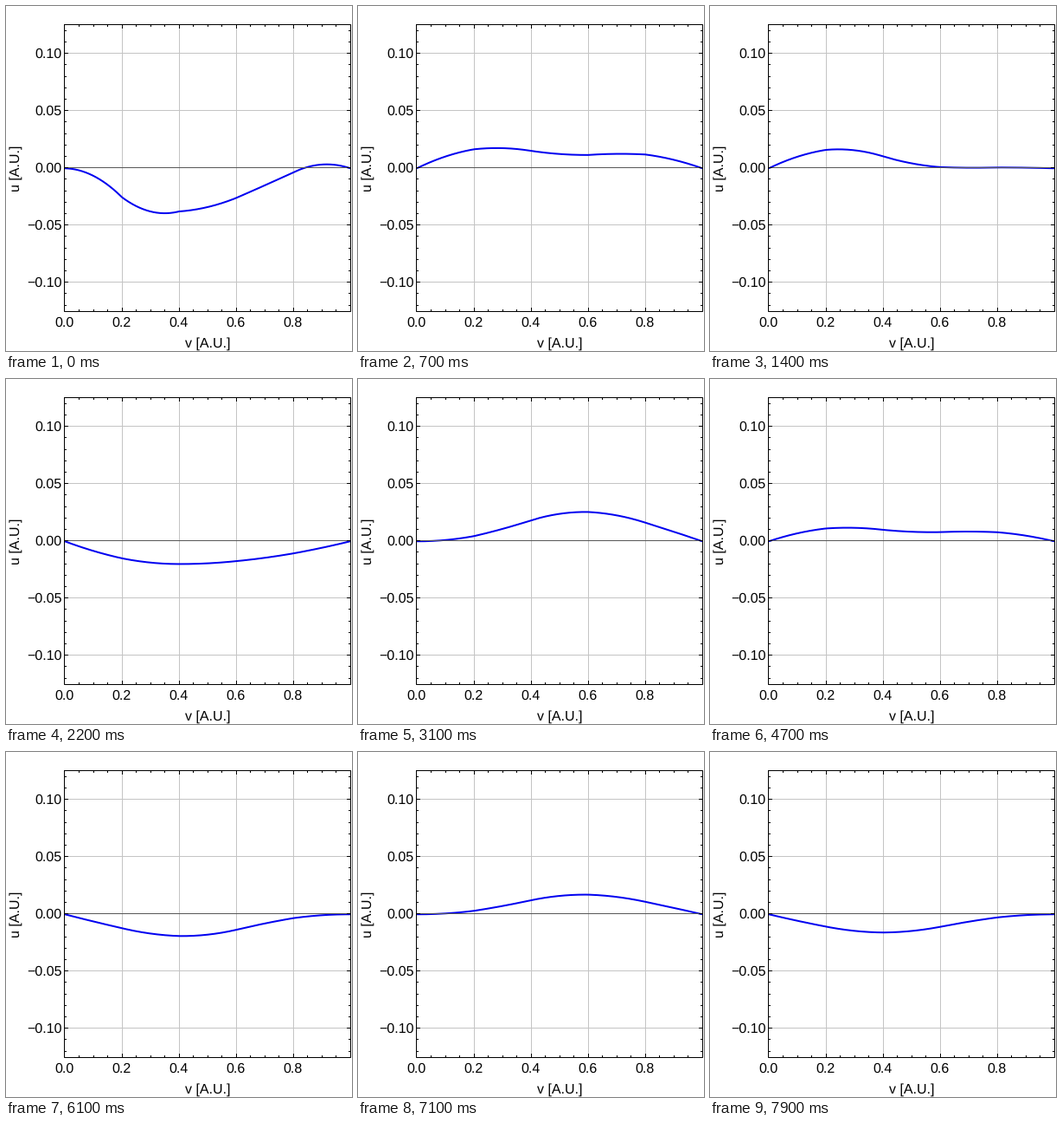
Write a matplotlib script that moves like this. It is 400x398 px and loops after 8000 ms.

```python
import numpy as np
import matplotlib.pyplot as plt
from matplotlib.animation import FuncAnimation

W, H, DPI = 400, 398, 100
LEFT, RIGHT, TOP, BOTTOM = 67, 398, 21, 352  # pixels of the frame
X0, Y0, SX, SY = 68, 186.75, 330, 1320       # origin and scale of the data
FRAMES, INTERVAL = 80, 100
PX = 72 / DPI

plt.rcParams["font.family"] = "Liberation Sans"
plt.rcParams["text.hinting"] = "none"

fig = plt.figure(figsize=(W / DPI, H / DPI), dpi=DPI, facecolor="white")
ax = fig.add_axes([0, 0, 1, 1])
ax.set_xlim(0, W)
ax.set_ylim(H, 0)
ax.axis("off")


def px(v):
    return X0 + SX * v


def py(u):
    return Y0 - SY * u


def rule(x, y, color="black", z=5):
    """One-pixel line through pixel centres."""
    ax.plot(np.floor(x) + 0.5, np.floor(y) + 0.5, color=color, lw=PX,
            zorder=z, snap=False, solid_capstyle="projecting",
            solid_joinstyle="miter")


def label(x, y, text, **kw):
    ax.text(x, y, text, fontsize=16 * PX, va="baseline", zorder=6, **kw)


# Grid, ticks and tick labels
for i in range(21):
    x, major = px(i / 20), i % 4 == 0
    size = 4 if major else 2
    if 0 < i < 20:
        rule([x, x], [BOTTOM, BOTTOM - size])
        rule([x, x], [TOP, TOP + size])
        if major:
            rule([x, x], [TOP, BOTTOM], "#c4c4c4", 1)
    if major and i < 20:
        label(x, 370, f"{i / 20:.1f}", ha="center")

for i in range(-12, 13):
    y, major = py(i / 100), i % 5 == 0
    size = 4 if major else 2
    rule([LEFT, LEFT + size], [y, y])
    rule([RIGHT, RIGHT - size], [y, y])
    if major:
        rule([LEFT, RIGHT], [y, y], "#c4c4c4", 1)
        label(65, y + 5.3, f"{i / 100:.2f}".replace("-", "\u2212"), ha="right")

rule([LEFT, RIGHT], [py(0)] * 2, "#585858", 4)
rule([LEFT, RIGHT, RIGHT, LEFT, LEFT], [TOP, TOP, BOTTOM, BOTTOM, TOP])
label(233, 393.8, "v [A.U.]", ha="center")
label(15.8, 187, "u [A.U.]", ha="center", rotation=90, rotation_mode="anchor")

# Standing waves of a damped string: amplitude, phase, decay rate
MODES = np.array([
    [0.0310, 0.0, 0.1],
    [-0.0110, 3.5, 0.1],
    [-0.0050, -4.5, 0.1],
    [0.0005, 0.0, 1.0],
    [-0.0031, 0.0, 1.8],
    [0.0011, 0.0, 3.0],
    [-0.0010, 0.0, 4.0],
])
AMP, PHASE, DECAY = MODES.T
N = np.arange(1, len(MODES) + 1)
NODES = np.linspace(0, 1, 11)
SHAPES = np.sin(np.pi * np.outer(NODES, N))

# Quadratic elements of width 0.2
V = np.linspace(0, 1, 331)
ELEM = np.minimum((V * 5).astype(int), 4)
S = V * 5 - ELEM


def string(t):
    q = AMP * np.exp(-DECAY * t) * np.cos(N * np.pi * (1 + t) + np.radians(PHASE))
    u = SHAPES @ q
    a, m, b = u[2 * ELEM], u[2 * ELEM + 1], u[2 * ELEM + 2]
    return a * (1 - S) * (1 - 2 * S) + 4 * m * S * (1 - S) + b * S * (2 * S - 1)


def height(t):
    return py(string(t)) + 0.5


curve, = ax.plot(px(V), height(0), color="#0000f0", lw=2 * PX, zorder=3,
                 snap=False, solid_capstyle="butt", solid_joinstyle="round")


def draw(i):
    curve.set_ydata(height(i * INTERVAL / 1000))
    return curve,


anim = FuncAnimation(fig, draw, frames=FRAMES, interval=INTERVAL, repeat=True)
plt.show()
```
